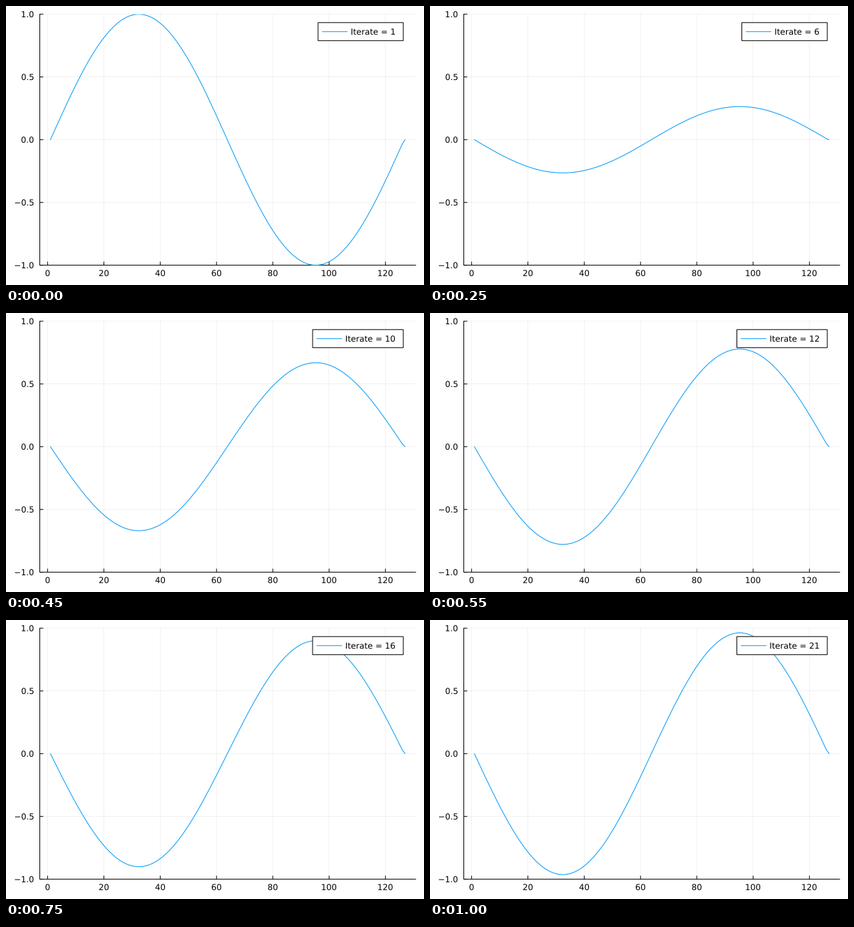
A matplotlib script for the animation above (1.05 s loop, 600 px wide and 400 px high).

```python
import numpy as np
import matplotlib.pyplot as plt
from matplotlib.animation import FuncAnimation
from matplotlib.patches import PathPatch, Rectangle
from matplotlib.textpath import TextPath
from matplotlib.transforms import Affine2D

W, H, DPI = 600, 400, 100
FRAMES, INTERVAL = 21, 50
LEFT, RIGHT, TOP, BOTTOM = 48.484, 588.19, 11.811, 371.612
XMIN, XMAX = -2.78, 130.78
EM, CAP = 11.852, 8.64           # font size and capital height in px
TICK = 4.724
BLUE = "#009AFA"
LEG_RIGHT, LEG_TOP, LEG_BOTTOM = 570.2, 23.804, 49.724
LEG_MID = (LEG_TOP + LEG_BOTTOM) / 2


def px(x):
    return LEFT + (x - XMIN) / (XMAX - XMIN) * (RIGHT - LEFT)


def py(y):
    return BOTTOM - (y + 1) / 2 * (BOTTOM - TOP)


fig = plt.figure(figsize=(W / DPI, H / DPI), dpi=DPI, facecolor="white")
ax = fig.add_axes([0, 0, 1, 1])
ax.set(xlim=(0, W), ylim=(H, 0))
ax.axis("off")


def line(xs, ys, color="black", width=1.0, z=2, alpha=1.0):
    (ln,) = ax.plot(xs, ys, color=color, lw=width * 72 / DPI, alpha=alpha,
                    zorder=z, solid_capstyle="round", solid_joinstyle="round",
                    snap=False)
    return ln


def glyphs(text, x, baseline, align):
    """Outline of text whose inked extent is aligned at x (0 left, 1 right)."""
    path = TextPath((0, 0), text, size=EM, prop={"family": "DejaVu Sans"})
    box = path.get_extents()
    shift = x - box.x0 - align * box.width
    move = Affine2D().scale(1, -1).translate(shift, baseline)
    return path.transformed(move), box.width


def label(text, x, baseline, align):
    path, _ = glyphs(text, x, baseline, align)
    return ax.add_patch(PathPatch(path, fc="black", lw=0, zorder=7, snap=False))


# Grid, ticks and tick labels
for v in range(0, 121, 20):
    x = px(v)
    line([x, x], [BOTTOM, TOP], width=0.5, z=1, alpha=0.1)
    line([x, x], [BOTTOM, BOTTOM - TICK])
    label(str(v), x, 387.21, 0.5)

for v in (-1, -0.5, 0, 0.5, 1):
    y = py(v)
    line([LEFT, RIGHT], [y, y], width=0.5, z=1, alpha=0.1)
    line([LEFT, LEFT + TICK], [y, y])
    label(f"{v:.1f}".replace("-", "\u2212"), 39.48, y + CAP / 2, 1)

line([LEFT, RIGHT], [BOTTOM, BOTTOM])
line([LEFT, LEFT], [BOTTOM, TOP])

# Sampled sine wave, closed by a zero end point
wave = np.append(np.sin(0.05 * np.arange(126)), 0.0)
curve = line(px(np.arange(1, 128)), py(wave), BLUE, z=3)
curve.set_clip_path(Rectangle((LEFT, TOP), RIGHT - LEFT, BOTTOM - TOP,
                              transform=ax.transData))

# Legend
frame_box = ax.add_patch(Rectangle((0, LEG_TOP), 1, LEG_BOTTOM - LEG_TOP,
                                   fc="white", ec="black", lw=72 / DPI,
                                   zorder=5, snap=False))
sample = line([0, 1], [LEG_MID, LEG_MID], BLUE, z=6)
caption = label("Iterate = 1", 0, LEG_MID + CAP / 2, 0)


def update(i):
    amp = 2 * np.exp(-0.2 * i) - 1
    curve.set_ydata(py(amp * wave))

    text = f"Iterate = {i + 1}"
    _, width = glyphs(text, 0, 0, 0)
    left = LEG_RIGHT - 60 - width
    frame_box.set_x(left)
    frame_box.set_width(LEG_RIGHT - left)
    sample.set_xdata([left + 6, left + 42])
    caption.set_path(glyphs(text, left + 48, LEG_MID + CAP / 2, 0)[0])
    return curve, frame_box, sample, caption


anim = FuncAnimation(fig, update, frames=FRAMES, interval=INTERVAL,
                     repeat=True, repeat_delay=0, blit=False)
plt.show()
```
